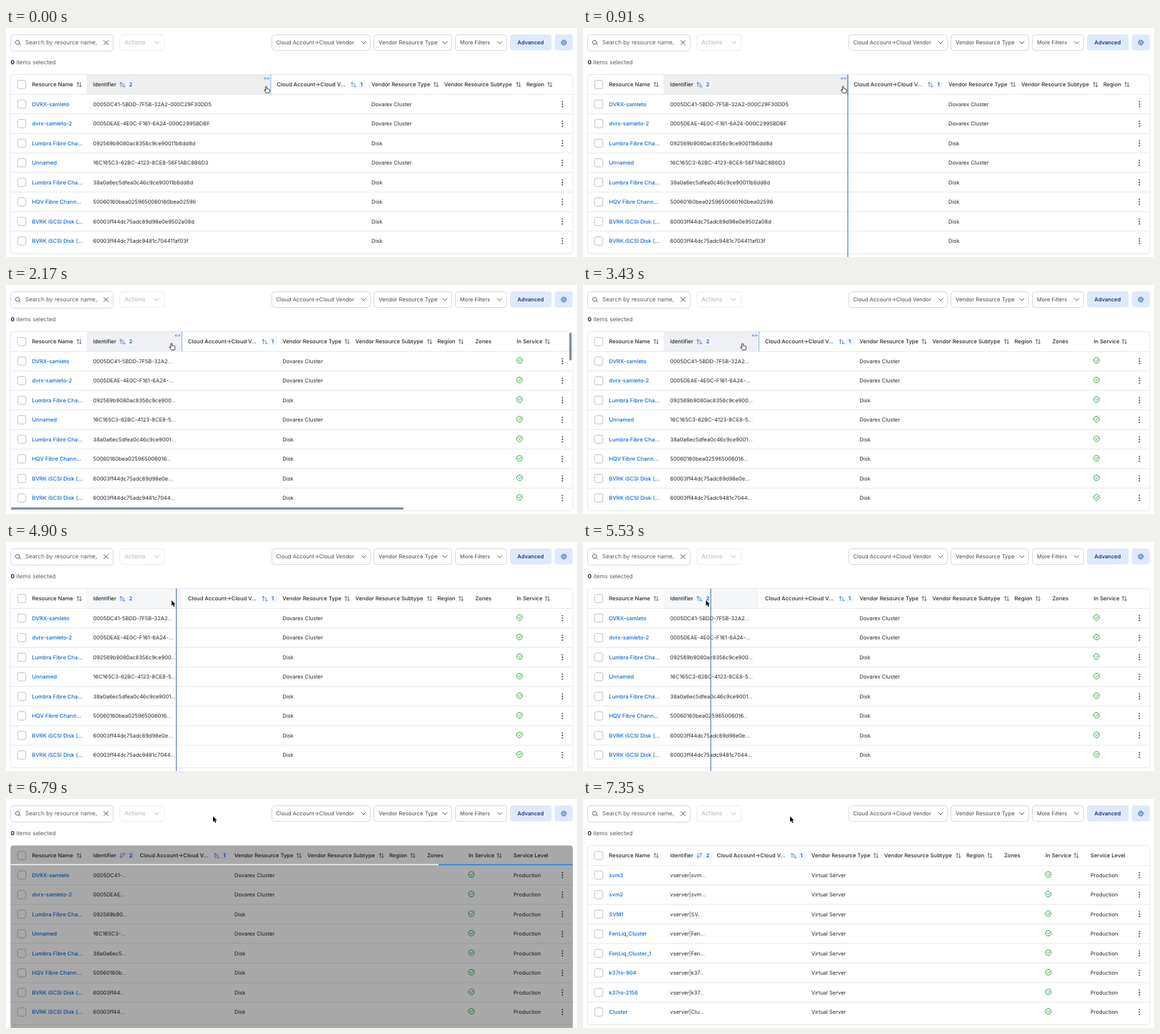
Recreate the animation shown at these times as an HTML page. Size 800 by 322 pixels, loop 7.56 s.

```html
<!DOCTYPE html>
<html lang="en">
<head>
<meta charset="utf-8">
<title>Resizing a table column</title>
<style>
  html, body { margin: 0; width: 100%; height: 100%; overflow: hidden; background: #fff; }
  svg { display: block; width: 800px; height: 322px; font-family: Inter, sans-serif; text-rendering: geometricPrecision; }
  text { white-space: pre; }
</style>
</head>
<body>
<svg id="stage" viewBox="0 0 800 322"></svg>
<script>
const LOOP = 7560, STEP = 70;
const INK = '#25282d', BLUE = '#0a6ad6', BORDER = '#d6d9de', RULE = '#e6e8eb';
const TIME = { drag1: 910, drop1: 2030, drag2: 4620, drop2: 5740, loaded: 7000 };
const SEPARATORS = [371, 246.5, 179];

// name, identifier, characters kept at the two narrower widths, type
const FIRST_PAGE = [
  ['DVRX-samleto', '0005DC41-5BDD-7F5B-32A2-000C29F30DD5', 23, 9, 'Dovarex Cluster'],
  ['dvrx-samleto-2', '0005DEAE-4E0C-F161-6A24-000C2995BDBF', 24, 8, 'Dovarex Cluster'],
  ['Lumbra Fibre Cha...', '092569b9080ac8356c9ce90011b6dd8d', 24, 9, 'Disk'],
  ['Unnamed', '16C165C3-62BC-4123-8CE8-56F1ABC8B6D3', 25, 9, 'Dovarex Cluster'],
  ['Lumbra Fibre Cha...', '38a0a6ec5dfea0c46c9ce90011b6dd8d', 25, 9, 'Disk'],
  ['HQV Fibre Chann...', '50060160bea0259650060160bea02596', 23, 9, 'Disk'],
  ['BVRK iSCSI Disk (...', '60003ff44dc75adc89d98e0e9502a08d', 24, 9, 'Disk'],
  ['BVRK iSCSI Disk (...', '60003ff44dc75adc9481c704411af03f', 25, 9, 'Disk']
];
const SORTED_PAGE = [
  ['svm3', 'svm'], ['svm2', 'svm'], ['SVM1', 'SV'], ['FenLiq_Cluster', 'Fen'],
  ['FenLiq_Cluster_1', 'Fen'], ['k37ro-904', 'k37'], ['k37ro-2156', 'k37'], ['Cluster', 'Clu']
].map(([name, id]) => [name, `vserver|${id}...`, 0, 0, 'Virtual Server']);

// Pointer stops: time, x, y
const POINTER = [
  [0, 364.5, 82], [910, 364.5, 82], [1400, 267, 75.5], [2030, 240, 82], [2310, 223.5, 82],
  [3710, 223.5, 82], [4340, 240, 82], [4900, 231, 82], [5600, 172, 82],
  [5740, 178.5, 81.5], [6440, 290, 24.5], [LOOP, 290, 24.5]
];

const clamp = u => Math.max(0, Math.min(1, u));
const mix = (a, b, u) => a + (b - a) * u;
const progress = (t, from, to) => clamp((t - from) / (to - from));
const smooth = u => u * u * (3 - 2 * u);
const sineOut = u => Math.sin(u * Math.PI / 2);
const cubicInOut = u => u < .5 ? 4 * u ** 3 : 1 - 4 * (1 - u) ** 3;

function bezier(x, x1, y1, x2, y2) {
  const at = (s, a, b) => 3 * (1 - s) ** 2 * s * a + 3 * (1 - s) * s * s * b + s ** 3;
  let low = 0, high = 1;
  for (let i = 0; i < 24; i++) {
    const mid = (low + high) / 2;
    if (at(mid, x1, x2) < x) low = mid; else high = mid;
  }
  return at(low, y1, y2);
}

const text = (x, y, value, size = 7.5, weight = 400, fill = INK) =>
  `<text x="${x}" y="${y + size * .36}" font-size="${size}" font-weight="${weight}" fill="${fill}">${value}</text>`;
const heading = (x, value) => text(x, 79.5, value, 7.6, 500);
const rect = (x, y, w, h, fill, rx = 0, extra = '') =>
  `<rect x="${x}" y="${y}" width="${w}" height="${h}" rx="${rx}" fill="${fill}" ${extra}/>`;
const outline = (x, y, w, h, rx, color) => rect(x, y, w, h, '#fff', rx, `stroke="${color}"`);
const path = (x, y, d, color, width = 1, extra = '') =>
  `<path transform="translate(${x} ${y})" d="${d}" fill="none" stroke="${color}" stroke-width="${width}" stroke-linecap="round" stroke-linejoin="round" ${extra}/>`;
const chevron = (x, color = '#555b65') => path(x, 20.5, 'M-3 -1.5L0 1.5L3 -1.5', color);
const checkbox = y => outline(16.2, y - 5.8, 11.6, 11.6, 2.5, '#bcc1c8');
const sortable = x => path(x, 79.5, 'M-1.7 3V-3M-3.2 -1.5L-1.7 -3L-.2 -1.5M1.7 -3V3M.2 1.5L1.7 3L3.2 1.5', '#4b5058', .8);

function sorted(x, rank, descending) {
  const arrow = descending ? 'M-2 -3V3M-3.5 1.5L-2 3L-.5 1.5' : 'M-2 3V-3M-3.5 -1.5L-2 -3L-.5 -1.5';
  const bars = descending ? 'M.5 -3H4M.5 -.8H3M.5 1.4H2' : 'M.5 -1.2H1.5M.5 .9H2.7M.5 3H4';
  return path(x, 79.5, arrow + bars, '#2f6fd0', .8) +
    rect(x + 6, 74, 11.5, 11, '#f3f7fe', 2.5) + text(x + 9.6, 79.5, rank, 7.5, 600, '#1957c2');
}

function toolbar() {
  const gear = `<g transform="translate(781.5 20.5)" fill="none" stroke="#1d58b8"><circle r="2.9" stroke-width=".9"/>
    <circle r="3.6" stroke-width=".9" stroke-dasharray="1.41 1.41"/><circle r="1.1" stroke-width=".8"/></g>`;
  return outline(6.5, 9.5, 143.5, 23, 4, BORDER) +
    path(16.5, 20.5, 'M2 1.4A2.9 2.9 0 1 1 1.4 -2.6A2.9 2.9 0 0 1 2 1.4L4 3.5', '#4b5058', .9) +
    text(27, 20.5, 'Search by resource name,', 8.15, 400, '#5a5f68') +
    path(140, 20.5, 'M-3 -3L3 3M3 -3L-3 3', '#4b5058') +
    outline(159.5, 9.5, 62.5, 22, 4, '#eaecee') + text(166, 20.5, 'Actions', 8.3, 400, '#b0b4ba') + chevron(211, '#b4b8be') +
    outline(372.5, 9.5, 138, 22, 4, BORDER) + text(378.5, 20.5, 'Cloud Account→Cloud Vendor', 7.6, 400, '#454a52') + chevron(501) +
    outline(515.5, 9.5, 109, 22, 4, BORDER) + text(522, 20.5, 'Vendor Resource Type', 7.7, 400, '#454a52') + chevron(615) +
    outline(629.5, 9.5, 72, 22, 4, BORDER) + text(636, 20.5, 'More Filters', 7.5, 400, '#454a52') + chevron(691.5) +
    rect(706, 9, 58.5, 22.5, '#dfe9fc', 4) + text(716.5, 20.5, 'Advanced', 7.55, 600, '#143b7d') +
    rect(769, 9, 25, 22.5, '#dfe9fc', 4) + gear +
    text(6.5, 48, '<tspan font-weight="700" fill="#25282d">0</tspan> items selected', 8.1, 400, '#5a5f68');
}

function hoverShade(t, separator) {
  if (t >= TIME.drop2) return '';
  if (t >= TIME.drag2) return rect(113, 66, separator - 114, 27, '#f6f7f9');
  return rect(113, 66, separator - 113, 27, t < TIME.drop1 ? '#eeeeef' : '#eff0f3') +
    path(separator, 66, 'M0 .5V27', '#4d92e6', 1, 'stroke-dasharray="1.2 2"') +
    path(separator - 6, 71, 'M-3.5 0H3.5M-2 -1.5L-3.5 0L-2 1.5M2 -1.5L3.5 0L2 1.5', '#4d92e6', .8);
}

function table(t, layout) {
  const separator = SEPARATORS[layout], shift = separator - SEPARATORS[0];
  const rows = t < TIME.loaded ? FIRST_PAGE : SORTED_PAGE;
  let out = outline(6.5, 65.5, 787.5, 252, 4, RULE) + hoverShade(t, separator) + path(0, 93.4, 'M7 0H793.5', RULE) +
    checkbox(79.5) + heading(36.5, 'Resource Name') + sortable(102.5) +
    heading(122, 'Identifier') + sorted(163, 2, layout === 2);
  let scrolled = heading(379.5, 'Cloud Account→Cloud V...') + sorted(487, 1, false) +
    heading(512, 'Vendor Resource Type') + sortable(602.5) +
    heading(614, 'Vendor Resource Subtype') + sortable(718) +
    heading(729, 'Region') + sortable(762) + heading(782, 'Zones') +
    heading(840, 'In Service') + sortable(883) + heading(903, 'Service Level');

  rows.forEach(([name, id, medium, narrow, type], i) => {
    const y = 107 + 27.5 * i, keep = [0, medium, narrow][layout];
    if (i) out += path(0, y - 13.8, 'M7 0H793.5', RULE);
    out += checkbox(y) + text(36.5, y, name, 7.55, 500, BLUE) +
      text(122, y, keep ? id.slice(0, keep) + '...' : id) +
      [-3.4, 0, 3.4].map(dy => `<circle cx="779.5" cy="${y + dy}" r=".95" fill="#30343a"/>`).join('');
    scrolled += text(512, y, type) + text(903, y, 'Production') +
      path(844, y - 1, 'M3.9 -.8A4 4 0 1 1 2 -3.4M-1.7 -.2L-.2 1.4L3.8 -2.8', '#2c9c3f', .95);
  });
  return out + `<g clip-path="url(#columns)"><g transform="translate(${shift} 0)">${scrolled}</g></g>`;
}

function scrollbars(t, layout) {
  const shown = layout === 1 ? TIME.drop1 : TIME.drop2;
  const opacity = layout ? 1 - progress(t, shown + 420, shown + 700) : 0;
  if (!opacity) return '';
  const color = '#7b8c95';
  return `<g opacity="${opacity}">` + rect(7, 312.7, layout === 1 ? 550 : 586, 3, color, 1.5) +
    rect(789.2, 67, 3.2, 39, color, 1.6) + '</g>';
}

function loading(t) {
  if (t < TIME.drop2 || t >= TIME.loaded) return '';
  const elapsed = 132 + (Math.min(t, 6790) - TIME.drop2) * .968;
  const p = bezier(elapsed / 1260, .65, .815, .735, .395);
  const left = clamp(-.35 + 1.35 * p), right = clamp(1.9 * p);
  return '<path d="M6.5 322V69.5Q6.5 65.5 10.5 65.5H790Q794 65.5 794 69.5V322Z" fill="#000" fill-opacity=".34"/>' +
    rect(7, 91.5, 787, 1.7, '#edf3fb') + rect(7 + left * 787, 91.5, (right - left) * 787, 1.7, '#1f78dc');
}

function dragLine(t) {
  if (t >= TIME.drag1 && t < TIME.drop1)
    return mix(SEPARATORS[0], SEPARATORS[1], sineOut(progress(t, TIME.drag1, 1750)));
  if (t >= TIME.drag2 && t < TIME.drop2)
    return mix(SEPARATORS[1], SEPARATORS[2], cubicInOut(progress(t, TIME.drag2, 5530)));
}

function pointer(t, line) {
  const i = POINTER.findIndex(stop => stop[0] > t);
  const [t0, x0, y0] = POINTER[i - 1], [t1, x1, y1] = POINTER[i];
  const u = smooth(progress(t, t0, t1));
  const x = line === undefined ? mix(x0, x1, u) : line - 6.7, y = mix(y0, y1, u);
  if (t >= TIME.drag2)
    return path(x, y, 'M0 0V7.6L1.8 6L3.1 9L4.5 8.4L3.2 5.5H5.6Z', '#fff', .8, 'style="fill:#000;paint-order:stroke"');
  return path(x, y, 'M-.9 5.6V.5Q0 -.9 .9 .5V3.4Q1.8 2.7 2.4 3.7Q3.4 3.1 3.8 4.1Q5 3.8 5 5V6.6Q4.8 8 4.2 9.3H-.4Q-1.2 7.6 -2.7 5.9Q-2.9 4.6 -1.7 4.8Z',
    '#222', .85, 'style="fill:#fff"');
}

function scene(t) {
  const layout = t < TIME.drop1 ? 0 : t < TIME.drop2 ? 1 : 2;
  const line = dragLine(t);
  return '<defs><clipPath id="columns"><rect width="770" height="322"/></clipPath></defs>' +
    toolbar() + table(t, layout) + scrollbars(t, layout) + loading(t) +
    (line === undefined ? '' : rect(line - .6, 65.5, 1.2, 257, '#5884bd')) + pointer(t, line);
}

const stage = document.getElementById('stage');
let start, drawn;
function tick(now) {
  start ??= now;
  const t = Math.floor((now - start) % LOOP / STEP) * STEP;
  if (t !== drawn) stage.innerHTML = scene(drawn = t);
  requestAnimationFrame(tick);
}
requestAnimationFrame(tick);
</script>
</body>
</html>
```
